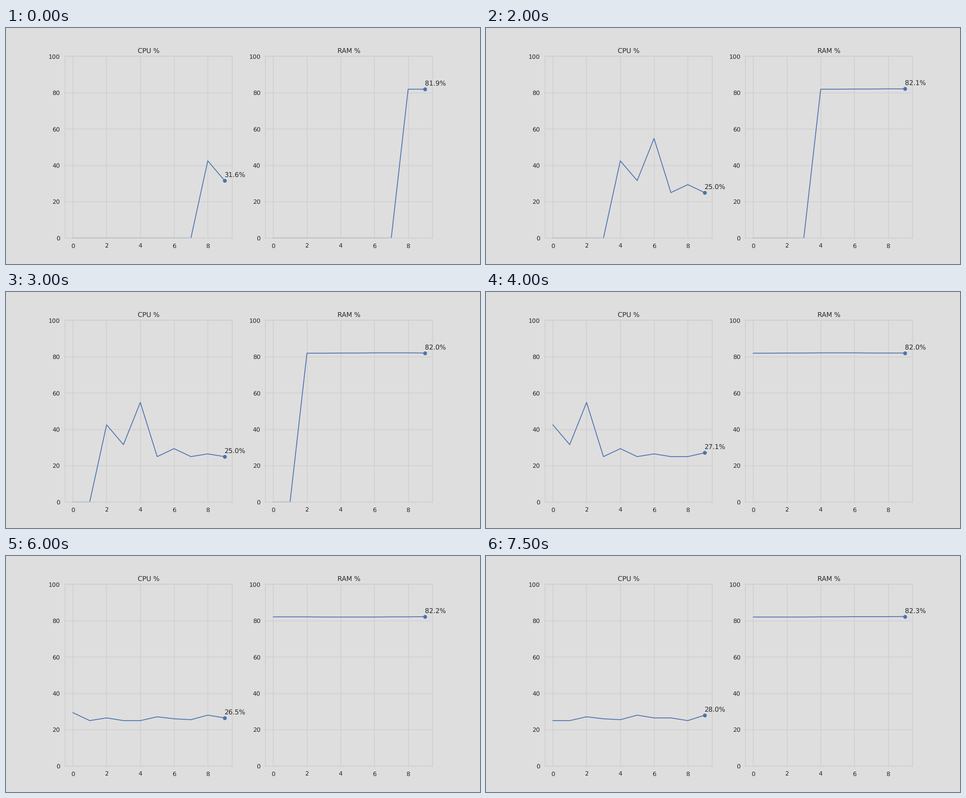
A matplotlib script that plays this animation: 1058 px wide and 529 px high, repeating every 8 s.

```python
import matplotlib.pyplot as plt
import numpy as np
from matplotlib.animation import FuncAnimation

BACK, GRID, INK, BLUE = "#dedede", "#cccccc", "#262626", "#4c72b0"
WINDOW, STEPS, STEP_MS = 10, 16, 500
IDLE = 25.0

plt.rcParams.update({
    "font.family": "DejaVu Sans",
    "font.size": 12,
    "text.color": INK,
    "text.hinting": "no_hinting",
    "figure.facecolor": BACK,
    "savefig.facecolor": BACK,
    "axes.facecolor": BACK,
    "axes.edgecolor": GRID,
    "axes.linewidth": 1.25,
    "axes.grid": True,
    "axes.axisbelow": True,
    "axes.titlesize": 12,
    "grid.color": GRID,
    "grid.linewidth": 1,
    "lines.solid_capstyle": "round",
    "xtick.labelsize": 11,
    "ytick.labelsize": 11,
    "xtick.color": INK,
    "ytick.color": INK,
    "xtick.major.size": 6,
    "ytick.major.size": 6,
    "xtick.bottom": False,
    "ytick.left": False,
})


def cpu_load():
    """Start-up spikes, a halving burst, then a regular ripple."""
    spikes = IDLE + np.array([17.5, 6.6, 29.8, 0, 4.4, 0, 1.5, 0, 0])
    fade = IDLE + 2.08 * 0.5 ** np.arange(3)
    phase = np.arange(STEPS + 1 - len(spikes) - len(fade)) % 4 / 3
    ripple = IDLE + 1.5 - 48 * (phase - 0.5) ** 5
    return np.r_[spikes, fade, ripple]


def ram_use():
    """A slow climb with one dip."""
    return np.interp(np.arange(STEPS + 1), [0, 5, 8, 16],
                     [81.88, 82.14, 81.96, 82.28])


class Monitor:
    def __init__(self, ax, title, readings):
        # The window starts out filled with zeros.
        self.data = np.r_[np.zeros(WINDOW - 2), readings.round(1)]
        ax.set_title(title)
        ax.set_xlim(-0.45, WINDOW - 0.55)
        ax.set_ylim(0, 100)
        ax.set_xticks(range(0, WINDOW, 2))
        self.line, = ax.plot([], [], color=BLUE, lw=1.5)
        self.dot = ax.scatter([WINDOW - 1], [0], s=36, color=BLUE,
                              linewidths=1, snap=False)
        self.label = ax.text(WINDOW - 1, 0, "")

    def show(self, step):
        values = self.data[step:step + WINDOW]
        last = values[-1]
        self.line.set_data(range(WINDOW), values)
        self.dot.set_offsets([(WINDOW - 1, last)])
        self.label.set_y(last + 2)
        self.label.set_text(f"{last:.1f}%")
        return self.line, self.dot, self.label


fig, (left, right) = plt.subplots(1, 2, figsize=(12, 6), dpi=1058 / 12)
monitors = [Monitor(left, "CPU %", cpu_load()),
            Monitor(right, "RAM %", ram_use())]


def update(step):
    return [artist for m in monitors for artist in m.show(step)]


anim = FuncAnimation(fig, update, frames=STEPS, interval=STEP_MS,
                     init_func=lambda: update(0), repeat=True, repeat_delay=0)
plt.show()
```
